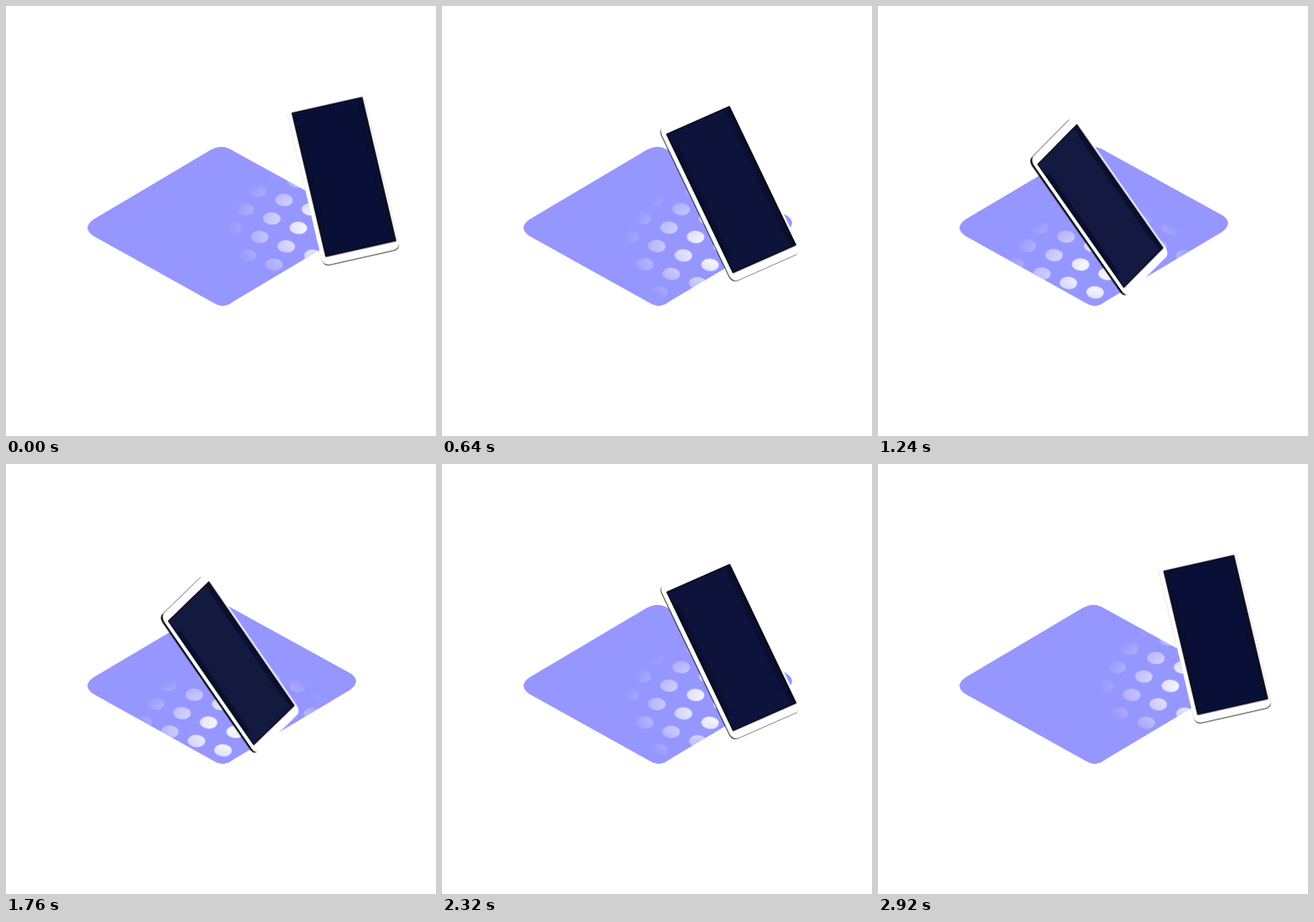
Write an HTML page without scripts that moves like this. It is 512 px wide and 512 px high and loops after 2.96 s.

```html
<!DOCTYPE html>
<html lang="en">
<head>
<meta charset="utf-8">
<title>Hovering phone</title>
<style>
  html, body { margin: 0; width: 100%; height: 100%; overflow: hidden; background: #fff; }
  svg { display: block; width: 100vw; height: 100vh; }

  .tilt, .glow, .edge, .glass {
    animation: 1480ms infinite alternate;
  }
  .tilt { animation-name: tilt; animation-timing-function: linear; }
  .glow, .edge, .glass { animation-timing-function: cubic-bezier(.37, 0, .63, 1); }
  .glow { animation-name: glow; }
  .edge { animation-name: edge; }
  .glass { animation-name: glass; }

  /* columns: width axis, height axis, centre */
  @keyframes tilt {
    0% {
      transform: matrix(.845, -.19, .2025, .86, 402.4, 203.5);
      animation-timing-function: cubic-bezier(.33, 0, .67, .34);
    }
    24.3% {
      transform: matrix(.83, -.24, .275, .855, 384, 208.5);
      animation-timing-function: cubic-bezier(.33, .27, .67, .62);
    }
    43.2% { transform: matrix(.76, -.335, .3975, .83, 344.6, 218.6); }
    59.5% {
      transform: matrix(.655, -.4, .47, .7925, 308.4, 226.8);
      animation-timing-function: cubic-bezier(.33, .4, .67, .76);
    }
    81.1% {
      transform: matrix(.49, -.475, .512, .742, 268.1, 237.3);
      animation-timing-function: cubic-bezier(.33, .65, .67, 1);
    }
    100% { transform: matrix(.43, -.49, .529, .73, 255.5, 240.5); }
  }
  @keyframes glow {
    from { transform: translate(385px, 265px); }
    to { transform: translate(262px, 322px); }
  }
  @keyframes edge {
    from { transform: translate(.3px, 1.4px); }
    to { transform: translate(-2.8px, .9px); }
  }
  @keyframes glass {
    from { fill: #0a0f38; }
    to { fill: #141a40; }
  }
</style>
</head>
<body>
<svg viewBox="0 0 512 512">
  <defs>
    <path id="pad" d="M104 254L244 171Q257 163.500 270 172L410 249Q424 258 410 269L270 352.500Q259 361.500 246 353L104 274Q90 264 104 254Z"/>
    <clipPath id="inPad"><use href="#pad"/></clipPath>
    <pattern id="dots" width="100" height="100" patternUnits="userSpaceOnUse"
      patternTransform="matrix(.317 .112 -.145 .22 293.400 258.400)">
      <circle cx="50" cy="50" r="30" fill="#fff"/>
    </pattern>
    <radialGradient id="fade">
      <stop offset=".25" stop-color="#fff"/>
      <stop offset="1" stop-color="#fff" stop-opacity="0"/>
    </radialGradient>
    <mask id="near" maskUnits="userSpaceOnUse" x="0" y="0" width="512" height="512">
      <ellipse class="glow" rx="120" ry="80" fill="url(#fade)"/>
    </mask>
  </defs>

  <g clip-path="url(#inPad)">
    <use href="#pad" fill="#9696ff"/>
    <g mask="url(#near)">
      <rect width="512" height="512" fill="url(#dots)" opacity=".88"/>
    </g>
  </g>

  <g class="edge">
    <rect class="tilt" x="-55.300" y="-110.300" width="107.600" height="220.600" rx="8"/>
  </g>
  <g class="tilt">
    <rect x="-56" y="-111" width="109" height="222" rx="9" fill="#fff"/>
    <rect x="-50" y="-100" width="100" height="200" rx="1" fill="#02040f"/>
    <rect x="-48" y="-98.500" width="96" height="197" fill="#0a0e30"/>
    <path class="glass" d="M-48-98.500H42V-88H40V80H42V98.500H-48V80H-41V-80H-48Z"/>
  </g>
</svg>
</body>
</html>
```
